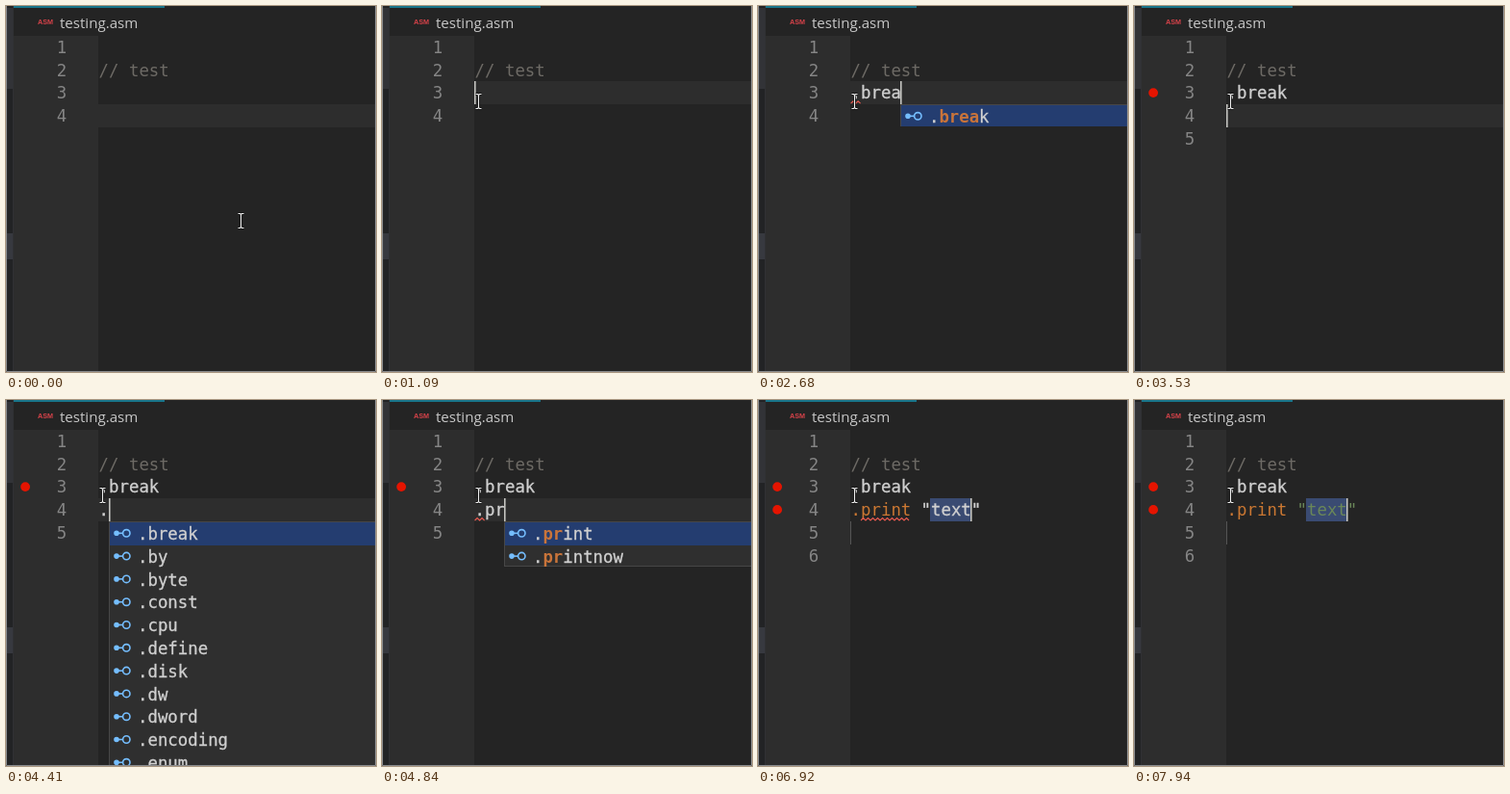
Animation, 385 px wide and 380 px high, one loop 8000 ms. Source, as an HTML page:

```html
<!DOCTYPE html>
<html lang="en">
<head>
<meta charset="utf-8">
<title>Assembler completion</title>
<style>
html, body { margin: 0; width: 100%; height: 100%; overflow: hidden; background: #242424; }
svg { display: block; width: 385px; height: 380px; }
text { white-space: pre; }
.code text { font: 17.36px "DejaVu Sans Mono", monospace; }
.num { fill: #858585; }
.comment { fill: #6d6a65; }
.plain { fill: #d0d0d0; stroke: #d0d0d0; stroke-width: .3; }
.key { fill: #cc7832; }
.str { fill: #6a8759; }
.code .hit { fill: #c9743a; font-weight: bold; }
.tab { font: 15.1px "Open Sans", sans-serif; fill: #c8c8c8; }
.badge { font: bold 7.2px "Liberation Sans", Arial, sans-serif; fill: #d8434a; }
.wave { fill: none; stroke: #ee5a50; stroke-width: 1.1; }
</style>
</head>
<body>
<svg viewBox="0 0 385 380">
  <defs><path id="beam" d="M-3 -7.5H-1L0 -6.5L1 -7.5H3M0 -6.5V6.5M-3 7.5H-1L0 6.5L1 7.5H3"/></defs>
  <rect width="385" height="380" fill="#242424"/>
  <rect width="8" height="380" fill="#222325"/>
  <rect y="2" width="8" height="84" fill="#323337"/>
  <rect y="236" width="8" height="27" fill="#37393f"/>
  <rect x="7" width="1" height="380" fill="#303134"/>
  <rect x="8" y="31" width="88" height="349" fill="#2d2d2d"/>
  <rect x="8" width="157" height="2" fill="#18748a"/>
  <text class="badge" x="33" y="19">ASM</text>
  <text class="tab" x="56" y="23">testing.asm</text>
  <g class="code" id="code"></g>
  <g id="mouse" fill="none">
    <use href="#beam" stroke="#111" stroke-width="2.6"/>
    <use href="#beam" stroke="#eee" stroke-width="1.1"/>
  </g>
  <path d="M.5 0V379.5H384.5V0" fill="none" stroke="#8a8b8d"/>
</svg>
<script>
const LOOP = 8000, CHAR = 10.42, LINE = 23.8, LEFT = 96.6;
const WORDS = '.break .by .byte .const .cpu .define .disk .dw .dword .encoding .enum .error'.split(' ');
const MENUS = {
  '': WORDS,
  b: ['.break', '.by', '.byte'],
  p: ['.plugin', '.print', '.printnow', '.pseudocommand', '.pseudopc', '.cpu'],
  pr: ['.print', '.printnow']
};

const at = (row, col) => ({ row, col, caret: true });
const type = (row, text) => ({ ['line' + row]: text, ...at(row, text.length), menu: text.slice(1) });

// Each entry changes part of the editor state at a given time.
const EVENTS = [
  [0, { lines: 4, line3: '', line4: '', row: 4, col: 0, breaks: 0 }],
  [1030, { caret: true }],
  [1090, at(3, 0)],
  [1520, { caret: false }],
  [1890, type(3, '.')],
  [2270, type(3, '.b')],
  [2330, { wave: [3, 0, 1] }],
  [2390, type(3, '.br')],
  [2440, type(3, '.bre')],
  [2680, type(3, '.brea')],
  [2860, { ...type(3, '.break'), breaks: 1 }],
  [3050, { wave: [3, 0, 4] }],
  [3300, { menu: null }],
  [3360, { wave: null, caret: false }],
  [3530, { lines: 5, ...at(4, 0) }],
  [4040, { caret: false }],
  [4410, type(4, '.')],
  [4660, type(4, '.p')],
  [4840, { ...type(4, '.pr'), wave: [4, 0, 1] }],
  [4970, type(4, '.pri')],
  [5030, type(4, '.prin')],
  [5150, type(4, '.print')],
  [5260, { breaks: 2 }],
  [5630, { caret: false }],
  [5690, { keyword: true, wave: [4, 0, 6] }],
  [6060, { caret: true }],
  [6550, { caret: false }],
  [6920, { lines: 6, line4: '.print "text"', menu: null, selected: true, ...at(4, 12), wave: [4, 1, 6] }],
  [7360, { caret: false }],
  [7420, { wave: null, string: true }],
  [7940, { caret: true }]
];

let state = {};
const STATES = EVENTS.map(([, patch]) => state = { ...state, ...patch });

const colX = col => Math.floor(LEFT + col * CHAR);
const rowY = row => 30.8 + (row - 1) * LINE;
const baseline = row => Math.floor(rowY(row) + 18.5);
const rect = (x, y, w, h, fill) => `<rect x="${x}" y="${y}" width="${w}" height="${h}" fill="${fill}"/>`;
const text = (x, y, cls, str) => str ? `<text x="${x}" y="${y}" class="${cls}">${str}</text>` : '';
const write = (row, col, cls, str) => text(LEFT + col * CHAR, baseline(row), cls, str);

function wave([row, from, to]) {
  const y = rowY(row) + 22.8, end = LEFT + to * CHAR;
  let x = LEFT + from * CHAR, up = false, d = `M${x} ${y}`;
  while ((x += 2.5) <= end) d += `L${x} ${(up = !up) ? y - 2.4 : y}`;
  return `<path class="wave" d="${d}"/>`;
}

function menuItem(x, y, label, typed) {
  const start = typed ? label.indexOf(typed) : label.length, end = start + typed.length;
  const part = (from, to, cls) => text(x + 30 + from * CHAR, y + 18.3, cls, label.slice(from, to));
  const mid = y + 11.7;
  return `<g fill="none" stroke="#75beff" stroke-width="1.6"><circle cx="${x + 8}" cy="${mid}" r="2" fill="#75beff"/>
    <path d="M${x + 8} ${mid}h6.5"/><circle cx="${x + 18.3}" cy="${mid}" r="3.7"/></g>` +
    part(0, start, 'plain') + part(start, end, 'hit') + part(end, label.length, 'plain');
}

function menu(row, col, typed) {
  const items = MENUS[typed] || WORDS.concat(MENUS.pr).filter(w => w.includes(typed));
  const x = colX(col), y = Math.round(rowY(row + 1)), h = Math.floor(items.length * LINE);
  return rect(x, y, 400, h, '#474747') + rect(x + 1, y + 1, 400, h - 2, '#2f2f2f') +
    rect(x + 1, y + 1, 400, Math.min(24, h - 1), '#243d70') +
    items.map((label, i) => menuItem(x, y + .6 + i * LINE, label, typed)).join('');
}

function draw(s) {
  const rowTop = Math.round(rowY(s.row));
  let out = s.selected ? '' : rect(96, rowTop, 288, 24, '#2d2d2d');
  for (let n = 1; n <= s.lines; n++) out += text(52.7, baseline(n), 'num', n);
  for (let n = 0; n < s.breaks; n++) out += `<circle cx="20.1" cy="${rowY(n + 3) + 11.7}" r="4.9" fill="#e51400"/>`;
  if (s.selected) {
    out += rect(colX(8), rowTop, colX(12) - colX(8), 24, '#3a4b72');
    out += rect(96, rowTop + 24, 1, 24, '#555');
  }
  out += write(2, 0, 'comment', '// test') + write(3, 0, 'plain', s.line3);
  out += write(4, 0, s.keyword ? 'key' : 'plain', s.line4.slice(0, 6));
  out += write(4, 7, s.string ? 'str' : 'plain', s.line4.slice(7));
  if (s.wave) out += wave(s.wave);
  if (s.menu != null) out += menu(s.row, s.col, s.menu);
  if (s.caret) out += rect(colX(s.col), rowTop, 1.6, 24, '#c4c4c0');
  return out;
}

const code = document.getElementById('code'), mouse = document.getElementById('mouse');
let shown = -1;

function tick() {
  const t = performance.now() % LOOP;
  const now = EVENTS.findLastIndex(([start]) => start <= t);
  if (now !== shown) code.innerHTML = draw(STATES[shown = now]);

  const step = Math.min(8, Math.max(0, Math.floor((t - 240) / 52.8) + 1)) / 8;
  const p = step * step * (3 - 2 * step);
  const x = 244.5 - Math.round(144 * p), y = 223 - Math.round(123 * p) - (t >= 850 ? 1 : 0);
  mouse.setAttribute('transform', `translate(${x} ${y})`);
  requestAnimationFrame(tick);
}
tick();
</script>
</body>
</html>
```
